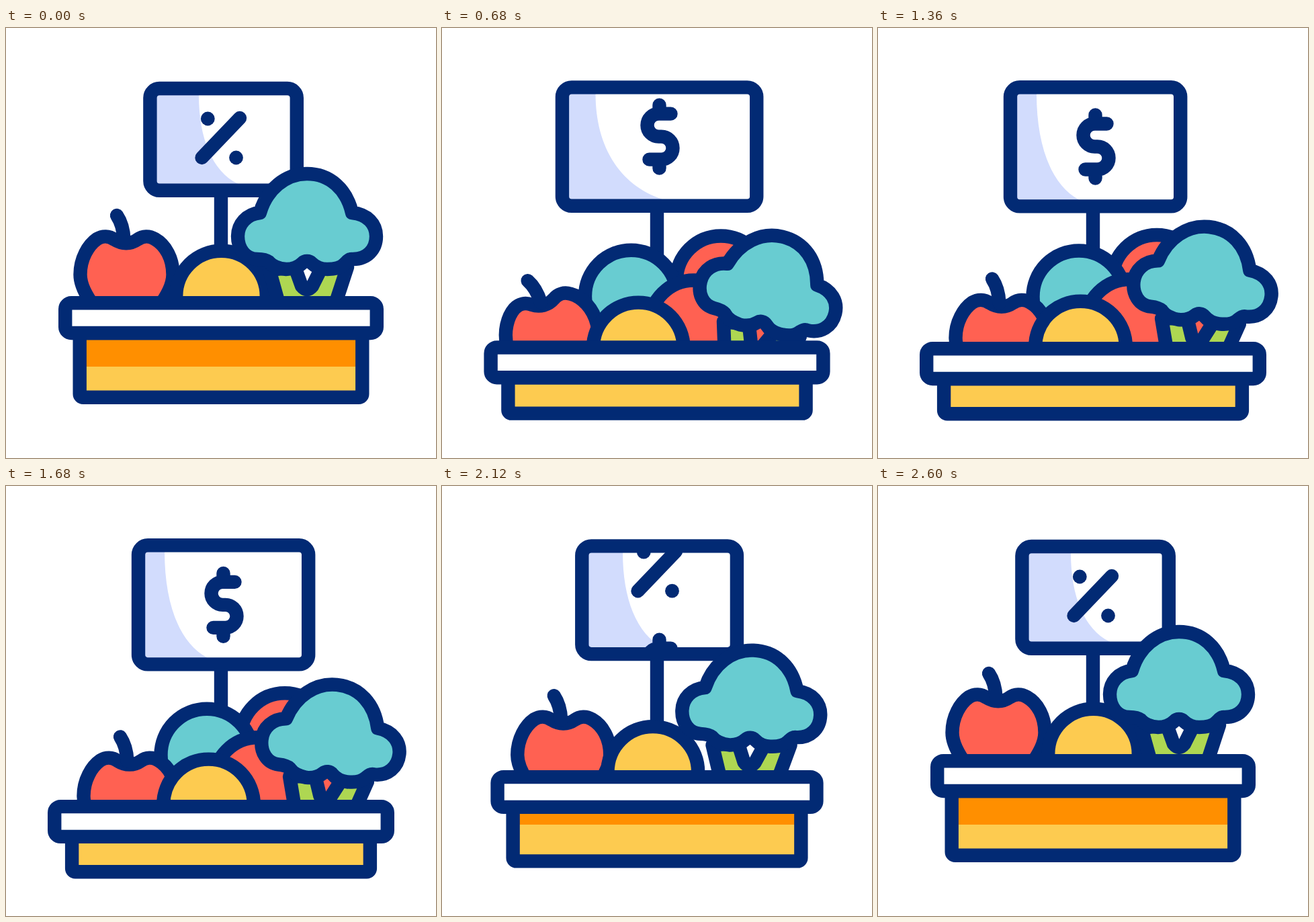
Animation, 640 px wide and 640 px high, one loop 3 s. Source, as an HTML page:

```html
<!DOCTYPE html>
<html lang="en">
<head>
<meta charset="utf-8">
<title>Market stall</title>
<style>
  html, body { margin: 0; width: 100%; height: 100%; overflow: hidden; background: #fff; }
  svg { display: block; width: 100vw; height: 100vh; }
  .line { stroke: #022a74; stroke-width: 20.4; stroke-linecap: round; stroke-linejoin: round; }
  .none { fill: none; }
  .navy { fill: #022a74; }
  .white { fill: #fff; }
  .red { fill: #ff6152; }
  .teal { fill: #68ccd1; }
  .yellow { fill: #fdcb50; }
  .orange { fill: #ff8f00; }
  .green { fill: #aed752; }
  .shade { fill: #d2dcfd; }
</style>
</head>
<body>
<svg viewBox="0 0 640 640">
  <defs>
    <clipPath id="signClip"><rect id="signHole" rx="12"/></clipPath>
    <clipPath id="aboveTable"><rect id="above" width="640"/></clipPath>
  </defs>

  <path class="line none" id="pole"/>
  <rect class="white" id="signFill" rx="14"/>
  <g clip-path="url(#signClip)">
    <path class="shade" id="shade"/>
    <g id="percent">
      <circle class="navy" cx="300.3" cy="-29" r="10.4"/>
      <circle class="navy" cx="342.5" cy="29" r="10.4"/>
      <path class="line" d="M291.5 29 L348 -30"/>
    </g>
    <path class="line none" id="dollar"
      d="M17 -34 H-1 a17 17 0 0 0 0 34 H3 a17 17 0 0 1 0 34 H-15 M0 -47 V-34 M0 34 V47"/>
  </g>
  <rect class="line none" id="signFrame" rx="14"/>

  <g clip-path="url(#aboveTable)">
    <circle class="line red" id="topRed" r="66"/>
    <circle class="line teal" id="melon" r="68.5"/>
    <circle class="line red" id="lowRed" r="66"/>
    <circle class="red" id="backRed" r="25"/>
    <g id="apple">
      <path class="line red" d="M-48 48 C-60 32 -69 14 -69 0 C-69 -24 -57 -44 -44 -53 C-36 -58 -26 -58 -18 -52
        C-7 -45 6 -45 16 -52 C24 -58 34 -58 42 -53 C58 -44 69 -24 69 0 C69 14 60 32 48 48 Z"/>
      <path class="line none" d="M-14.5 -88 Q-5 -74 -4 -52"/>
    </g>
    <circle class="line yellow" id="lemon" r="67.3"/>
    <g id="broccoli">
      <path class="line green" d="M-56 50 L-41 104 H41 L60 46 L22 46 L8 74 Q0 84 -8 74 L-18 46 Z"/>
      <path class="line teal" d="M-74 34 C-92 34 -103 18 -103 0 C-103 -18 -90 -33 -70 -35 C-60 -70 -32 -93 0 -93
        C34 -93 59 -70 67 -35 C90 -33 103 -18 103 0 C103 20 89 34 69 34 C63 33 60 37 57 40 C52 46 42 49 30 49
        C20 49 12 45 7 40 C3 36 -3 36 -7 40 C-13 46 -21 49 -31 49 C-43 48 -52 44 -57 38 C-61 35 -67 34 -74 34 Z"/>
    </g>
  </g>

  <rect class="yellow" id="crate"/>
  <rect class="orange" id="crateShade"/>
  <rect class="line none" id="crateFrame" rx="5"/>
  <rect class="line white" id="table" rx="9"/>
</svg>
<script>
const LOOP = 3000, BACK = 1662;

const el = {};
document.querySelectorAll('[id]').forEach(n => el[n.id] = n);

const clamp = v => Math.min(1, Math.max(0, v));
const smooth = u => u * u * (3 - 2 * u);
const logistic = t => 1 / (1 + Math.exp((413 - t) / 75));
const rise = t => clamp((logistic(t) - logistic(0)) / (logistic(900) - logistic(0)));

function set(node, attrs) {
  for (const k in attrs) node.setAttribute(k, attrs[k]);
}
const box = (node, x, y, right, bottom) =>
  set(node, { x, y, width: right - x, height: Math.max(0, bottom - y) });
const place = (node, x, y, turn = 0) =>
  node.setAttribute('transform', `translate(${x} ${y}) rotate(${turn})`);

function drawSign(t, p, sway) {
  const half = 109.2 + 17.4 * p + 19 * sway, left = 323.6 - half, right = 323.6 + half;
  const top = 90 - 1.7 * p, bottom = 241.8 + 23.6 * p;
  for (const n of [el.signFill, el.signHole, el.signFrame]) box(n, left, top, right, bottom);

  const x0 = 287 - 51 * p - 9 * sway, x1 = 345 - 46 * p + 28 * sway;
  const y0 = top + 10, y1 = bottom - 10, h = y1 - y0;
  el.shade.setAttribute('d', `M${left} ${top} H${x0} V${y0} C${x0} ${y0 + h * .48} ` +
    `${x0 + (x1 - x0) * .34} ${y0 + h * .86} ${x1} ${y1} V${bottom} H${left} Z`);

  // Both symbols scroll down: the dollar replaces the percent, then the reverse.
  const swap = rise(t - 80), swapBack = rise(t - 1645);
  place(el.percent, 0, t < BACK - 300 ? 164 + 200 * swap : 164 - 122 * (1 - swapBack));
  place(el.dollar, 323.5, 176.5 - 200 * (1 - swap) + 142 * swapBack);
  el.pole.setAttribute('d', `M320 ${bottom} V420`);
}

function drawTable(p) {
  const top = 409.2 + 68 * p, half = 231.8 + 16 * p, bottom = top + 44.8;
  const crateHalf = 210.3 + 11.6 * p, crateBottom = 549.8 + 24.5 * p;
  const left = 320 - crateHalf, right = 320 + crateHalf;
  box(el.table, 320 - half, top, 320 + half, bottom);
  box(el.above, 0, 0, 640, top);
  box(el.crate, left, bottom, right, crateBottom);
  box(el.crateShade, left, bottom, right, 504);
  box(el.crateFrame, left, bottom, right, crateBottom);
}

function drawProduce(p, sway) {
  place(el.apple, 179.5 + 5 * p - 21 * sway, 367 + 94.5 * p - 1.5 * sway, -15 * sway);
  place(el.broccoli, 448 + 35 * p + 3 * sway, 310 + 78.5 * p + 15 * sway, 6 * p + 7.7 * sway);
  place(el.lemon, 320.5 - 19 * p - 10 * sway, 399 + 75 * p + 4 * sway);

  // The rest sinks behind the table as it closes.
  const sink = 1 - p;
  place(el.melon, 299 - 18 * sway, 400 + 160 * sink - 5 * sway);
  place(el.topRed, 415, 374 + 245 * sink - 5 * sway);
  place(el.lowRed, 375, 440 + 245 * sink - 5 * sway);
  place(el.backRed, 473, 446 + 40 * sink);
}

function draw(t) {
  const p = rise(t) - rise(t - BACK);
  // Overshoot of the opening, which settles afterwards.
  const sway = p * (1 - smooth(clamp((t - 680) / 680)));
  drawSign(t, p, sway);
  drawTable(p);
  drawProduce(p, sway);
}

const start = performance.now();
function tick() {
  draw((performance.now() - start) % LOOP);
  requestAnimationFrame(tick);
}
tick();
</script>
</body>
</html>
```
